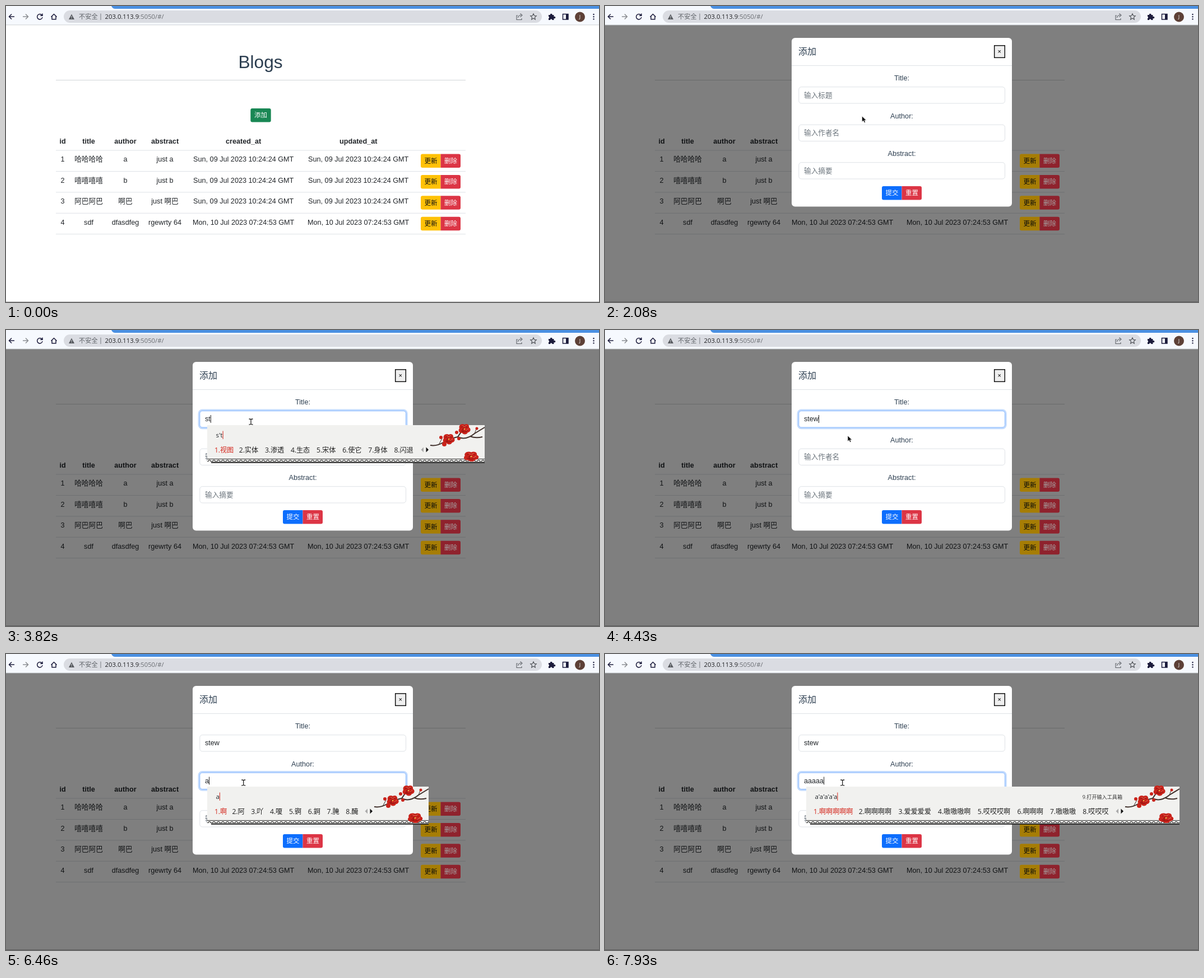
Write an HTML page that moves like this. It is 1058 px wide and 529 px high and loops after 8 s.

```html
<!DOCTYPE html>
<html lang="zh-CN">
<head>
<meta charset="utf-8">
<style>
html, body { margin: 0; width: 100%; height: 100%; overflow: hidden; background: #fff; }
svg { display: block; width: 100vw; height: 100vh; }
text { font-family: "Liberation Sans", "Noto Sans CJK SC", "Noto Sans CJK", sans-serif; font-size: 12.65px; fill: #212529; white-space: pre; }
.ui text { font-family: "Open Sans", "Noto Sans CJK SC", "Noto Sans CJK", sans-serif; }
.line { fill: none; stroke: #1c1c3c; stroke-width: 1.5; }
</style>
</head>
<body>
<svg id="stage" viewBox="0 0 1058 529" preserveAspectRatio="none">
  <defs>
    <pattern id="key" width="8" height="6" patternUnits="userSpaceOnUse" x="359" y="60">
      <path d="M0 .5H8M0 4.5H2.5V2.5H5.5V4.5H8" fill="none" stroke="#333"/>
    </pattern>
    <g id="bloom">
      <path d="M0-8C5-11 9-7 8-3C13 0 10 6 6 6C4 11-3 10-4 7C-10 8-12 2-9-1C-11-7-5-11 0-8Z" fill="#c9231b"/>
      <path d="M-6-3Q0-8 5-3M-6 3Q0 8 6 2M0-2Q-5 0-2 4" fill="none" stroke="#8d120f" stroke-width="1.2"/>
      <path d="M-4-6Q0-3 4-6M3 3Q6 1 7-1" fill="none" stroke="#ee6a55"/>
      <circle r="1.3" fill="#e9b24c"/>
    </g>
  </defs>
  <g id="page"></g>
  <rect id="shade" y="34" width="1058" height="495" opacity=".5"/>
  <g id="rowButtons"></g>
  <g id="modal"></g>
  <g class="ui" id="chrome">
    <rect width="1058" height="34" fill="#f6f9fe"/>
    <path d="M188 0H1058V5H195Q190 5 188 0Z" fill="#4a90e2"/>
    <path d="M0 33.8H1058" stroke="#cfd2d6"/>
    <rect x="103" y="8" width="853" height="22" rx="11" fill="#dadce2"/>
    <path class="line" d="M15 19H6M10 14.5L5.5 19L10 23.5"/>
    <path class="line" d="M30 19H39M35 14.5L39.5 19L35 23.5" style="stroke:#8a8d92"/>
    <path class="line" d="M64.2 16.5A4.7 4.7 0 1 0 65 20M65 13.5V17.2H61.3"/>
    <path class="line" d="M80.5 19.5L85.5 14.5L90.5 19.5M82 18.5V23.8H89V18.5"/>
    <path d="M117 14.5L122 24H112Z" fill="#55585d"/>
    <path d="M117 17.8V20.6M117 21.6V22.8" stroke="#dadce2" stroke-width="1.1"/>
    <path d="M169 13.5V25" stroke="#777a80"/>
    <path class="line" d="M913 17H911V24.5H920V22M913.5 21Q914 16.5 919 16.3M917.5 13.5L921 16.5L917.5 19.5" style="stroke:#5f6368;stroke-width:1.1"/>
    <path class="line" d="M941 13.8L942.6 17.3L946.3 17.7L943.5 20.2L944.3 24L941 22L937.700 24L938.500 20.200L935.700 17.700L939.400 17.300Z" style="stroke:#4a4d52;stroke-width:1.1"/>
    <path d="M968 16H971A1.8 1.8 0 1 1 974.500 16H977.500V19A1.800 1.800 0 1 1 977.500 22V25H974.500A1.700 1.700 0 0 0 971 25H968V22A1.700 1.700 0 0 0 968 18.800Z" fill="#1c1c3c"/>
    <rect class="line" x="993.500" y="14.500" width="9.500" height="9.500"/>
    <rect x="999" y="14" width="4" height="10" fill="#1c1c3c"/>
    <circle cx="1024" cy="19.500" r="9" fill="#5d4037"/>
    <path d="M1048.500 15v.01M1048.500 19.200v.01M1048.500 23.400v.01" stroke="#1c1c3c" stroke-width="2.400" stroke-linecap="round"/>
  </g>
  <g class="ui" id="panel">
    <rect id="sheet" x="359" width="395" height="60" fill="#f1f1ef"/>
    <rect id="trim" x="359" y="60" width="395" height="6" fill="#f1f1ef"/>
    <rect id="trimKey" x="359" y="60" width="395" height="6" fill="url(#key)"/>
    <rect id="trimBar" x="366" y="65.800" width="390" height="2" fill="#222"/>
    <g id="words"></g>
    <path id="redCaret" d="M0 10.500V25" stroke="#d4281e"/>
    <g id="arrows">
      <path d="M5 39.500V48.500L.5 44Z" fill="#aaa"/>
      <path d="M9.500 39.500V48.500L14 44Z" fill="#111"/>
    </g>
    <g id="flowers">
      <path d="M-97 36Q-86 38-74 31T-48 21Q-34 28-18 15L0 4M-48 21Q-42 13-38 5M-26 20Q-16 24-4 21" fill="none" stroke="#40302b" stroke-width="2"/>
      <path d="M-82 35L-76 24M-18 15L-15 7" stroke="#40302b"/>
      <use href="#bloom" x="-64" y="25"/>
      <use href="#bloom" x="-36" y="7"/>
      <use href="#bloom" transform="translate(-24 56) scale(1.25 .95)"/>
      <g fill="#c9231b"><circle cx="-78" cy="22" r="3"/><circle cx="-72" cy="34" r="4"/><circle cx="-50" cy="13" r="3"/><circle cx="-46" cy="24" r="3"/><circle cx="-14" cy="6" r="2.500"/></g>
    </g>
  </g>
  <path id="arrow" d="M0 0V10L2.500 7.800L4.200 11.500L6 10.700L4.400 7.200H7.600Z" fill="#111" stroke="#fff" stroke-width=".5"/>
  <path id="beam" d="M-3.500-5Q-.5-5 0-4Q.5-5 3.500-5M-3.500 5Q-.5 5 0 4Q.5 5 3.500 5M0-4V4" fill="none" stroke="#222" stroke-width="1.300"/>
</svg>
<script>
const LOOP = 8000, STEP = 70;
const $ = id => document.getElementById(id);

function add(parent, tag, attrs, text) {
  const el = document.createElementNS("http://www.w3.org/2000/svg", tag);
  for (const k in attrs) el.setAttribute(k, attrs[k]);
  if (text) el.textContent = text;
  return parent.appendChild(el);
}
const label = (parent, text, x, y, style = "", anchor = "start") =>
  add(parent, "text", { x, y, style, "text-anchor": anchor }, text);
const mid = (parent, text, x, y, style) => label(parent, text, x, y, style, "middle");
const show = (el, on) => { el.style.display = on ? "" : "none"; };
const set = (el, attrs) => { for (const k in attrs) el.setAttribute(k, attrs[k]); };

// A pair of joined buttons, 35.5 wide each
function pair(parent, x, y, items) {
  items.forEach(([text, fill, ink], i) => {
    const l = x + i * 35.5, r = l + 35.5;
    const d = i ? `M${l} ${y}H${r - 3}q3 0 3 3v18.500q0 3-3 3H${l}Z`
                : `M${r} ${y}H${l + 3}q-3 0-3 3v18.500q0 3 3 3H${r}Z`;
    add(parent, "path", { d, fill });
    mid(parent, text, l + 17.9, y + 16.2, `font-size:11.5px;fill:${ink}`);
  });
}

// Page
const page = $("page");
const rule = (y, color) => add(page, "path", { d: `M89 ${y}H820`, stroke: color });
add(page, "rect", { y: 34, width: 1058, height: 495, fill: "#fff" });
add(page, "path", { d: "M0 528.500H1058", stroke: "#bbb" });
mid(page, "Blogs", 454, 111, "font-size:31.6px;fill:#2c3e50");
rule(132.5, "#d2d5d8");
const addButton = add(page, "rect", { x: 436.3, y: 183, width: 36.4, height: 24.5, rx: 3 });
mid(page, "添加", 454.5, 199.2, "font-size:11.5px;fill:#fff");

const columns = [101, 147.5, 213, 283.5, 423.7, 628.7];
const early = "Sun, 09 Jul 2023 10:24:24 GMT", late = "Mon, 10 Jul 2023 07:24:53 GMT";
const rows = [
  ["1", "哈哈哈哈", "a", "just a", early, early],
  ["2", "嘻嘻嘻嘻", "b", "just b", early, early],
  ["3", "阿巴阿巴", "啊巴", "just 啊巴", early, early],
  ["4", "sdf", "dfasdfeg", "rgewrty 64", late, late]
];
["id", "title", "author", "abstract", "created_at", "updated_at"]
  .forEach((h, i) => mid(page, h, columns[i], 246, "font-weight:bold"));
rule(258, "#dee2e6");
rows.forEach((row, r) => {
  const y = r * 37.4;
  row.forEach((text, i) => mid(page, text, columns[i], 278.4 + y));
  rule(295.5 + y, "#dee2e6");
  pair($("rowButtons"), 740, 264.5 + y, [["更新", "#ffc107", "#111"], ["删除", "#dc3545", "#fff"]]);
});

// Dialog
const modal = $("modal");
add(modal, "rect", { x: 333, y: 57, width: 393, height: 301.5, rx: 6, fill: "#fff" });
add(modal, "path", { d: "M333 106.500H726", stroke: "#dee2e6" });
label(modal, "添加", 345, 87, "font-size:16px;fill:#2c3e50");
add(modal, "rect", { x: 694.7, y: 70.7, width: 18.6, height: 21.6, fill: "#efefef", stroke: "#111", "stroke-width": 1.5 });
mid(modal, "×", 703.8, 85.3, "font-size:11px;fill:#000");
const fields = [["Title:", "输入标题"], ["Author:", "输入作者名"], ["Abstract:", "输入摘要"]].map(([name, hint], i) => {
  const y = 144.7 + i * 67.5;
  mid(modal, name, 529.5, y - 11.7, "fill:#2c3e50");
  const box = { x: 345.8, y, width: 367.7, height: 29.3, rx: 4.5 };
  const ring = add(modal, "rect", { ...box, fill: "none", stroke: "#c2dbfe", "stroke-width": 6.4 });
  const frame = add(modal, "rect", { ...box, fill: "#fff" });
  return {
    y, ring, frame,
    hint: label(modal, hint, 355, y + 19.2, "fill:#6c757d"),
    text: label(modal, "", 355, y + 18.7),
    caret: add(modal, "path", { stroke: "#222" })
  };
});
pair(modal, 494, 322, [["提交", "#0d6efd", "#fff"], ["重置", "#dc3545", "#fff"]]);

// Browser bar texts
const bar = $("chrome");
label(bar, "不安全", 130, 23, "font-size:11.2px;fill:#5f6368");
const url = label(bar, "203.0.113.9", 176.5, 23, "font-size:11.3px;fill:#202124");
add(url, "tspan", { fill: "#6a6d72" }, ":5050/#/");
mid(bar, "J", 1024, 22.8, "font-size:9px;fill:#fff");

// Typing: time, field, value, candidates, right edge of the panel
const typing = [
  [3300, 0, ""],
  [3630, 0, "s", "是 说 上 时 使 谁 事 声", 754],
  [3820, 0, "st", "视图 实体 渗透 生态 宋体 使它 身体 闪退", 854],
  [3950, 0, "ste", "上天鹅 身体 实体 生态 视图 水田 食堂 渗透", 868],
  [4090, 0, "stew", "上天额外 身体额外 视图二维 实体 生态 渗透", 893],
  [4260, 0, "stew"],
  [5650, 1, ""],
  [6460, 1, "a", "啊 阿 吖 嗄 锕 錒 腌 醃", 754],
  [6590, 1, "aa", "啊啊 嗷嗷 爱爱 哎哎 啊啊啊 阿啊 哎啊 爱啊", 864],
  [6790, 1, "aaa", "啊啊啊 啊啊啊啊 爱爱爱爱 嗷嗷嗷啊 哎哎哎啊 嗷嗷嗷 爱爱爱 哎哎哎", 995, "9.打开工具箱"],
  [7330, 1, "aaaa", "啊啊啊啊 啊啊啊啊啊 爱爱爱爱 嗷嗷嗷啊 哎哎哎啊 啊啊啊 嗷嗷嗷 哎哎哎", 1025],
  [7530, 1, "aaaaa", "啊啊啊啊啊 啊啊啊啊 爱爱爱爱 嗷嗷嗷啊 哎哎哎啊 啊啊啊 嗷嗷嗷 哎哎哎", 1025, "9.打开输入工具箱"]
];

// Pointer moves: start, end, from, to
const moves = [
  [780, 1550, 1026, 520, 462, 200],
  [1620, 2020, 462, 200, 458.5, 197],
  [2740, 3160, 458.5, 197, 437, 164],
  [4290, 4430, 437, 164, 433, 189],
  [4500, 5110, 433, 189, 428, 245],
  [5310, 5580, 428, 245, 423.7, 230]
];

function pointer(t) {
  let move = null;
  for (const m of moves) if (t >= m[0]) move = m;
  if (!move) return null;
  const [t0, t1, x0, y0, x1, y1] = move;
  const p = Math.min(1, (Math.floor((t - t0) / STEP) + 1) / (Math.round((t1 - t0) / STEP) + 1));
  const e = p * p * (3 - 2 * p);
  return [x0 + (x1 - x0) * e, y0 + (y1 - y0) * e];
}

function drawPanel([, field, value, list, right, tip], withTip) {
  show($("panel"), !!list);
  if (!list) return;
  const words = $("words");
  words.replaceChildren();
  set($("panel"), { transform: `translate(0 ${170 + field * 67})` });
  ["sheet", "trim", "trimKey"].forEach(id => set($(id), { width: right - 359 }));
  set($("trimBar"), { width: right - 366 });
  set($("flowers"), { transform: `translate(${right} 0)` });
  set($("arrows"), { transform: `translate(${right - 114} 0)` });
  const spell = label(words, [...value].join("'"), 374.5, 22, "font-size:11.5px");
  set($("redCaret"), { transform: `translate(${375 + spell.getComputedTextLength()} 0)` });
  let x = 372;
  list.split(" ").forEach((word, i) => {
    label(words, `${i + 1}.${word}`, x, 48.6, `font-size:12.2px;letter-spacing:-.1px;fill:${i ? "#222" : "#d4281e"}`);
    x += 21.5 + 12.3 * word.length - (i ? 0 : 2.3);
  });
  if (withTip) label(words, tip, right - 102, 21.5, "font-size:9.1px;fill:#333", "end");
}

let shown = "";
function draw(t) {
  const open = t >= 2080;
  const at = pointer(t);
  const inside = (x, y, w, h) => !!at && at[0] > x && at[0] < x + w && at[1] > y && at[1] < y + h;

  show($("shade"), open);
  show(modal, open);
  $("rowButtons").style.filter = open ? "brightness(.65)" : "none";
  set(addButton, { fill: !open && inside(436, 183, 37, 25) ? "#146c43" : "#198754" });

  const past = typing.filter(s => t >= s[0]);
  const state = past[past.length - 1];
  const values = ["", "", ""];
  past.forEach(s => { values[s[1]] = s[2]; });
  fields.forEach((f, i) => {
    const on = !!state && state[1] === i;
    f.text.textContent = values[i];
    show(f.hint, !values[i]);
    show(f.ring, on);
    set(f.ring, { opacity: on ? Math.min(1, (t - typing[i ? 6 : 0][0] + 70) / 140) : 0 });
    set(f.frame, { stroke: on ? "#86b7fe" : "#dee2e6" });
    const start = on && state[0] === 5650 ? 5690 : on ? state[0] : 0;
    show(f.caret, on && (t < start || (t - start) % 1000 < 500));
    if (on && open) {
      const x = 355.5 + (values[i] ? f.text.getComputedTextLength() : 0);
      set(f.caret, { d: `M${x} ${f.y + 7.3}v14` });
    }
  });

  const withTip = !!state && !!state[5] && t >= state[0] + 400;
  const key = past.length + (withTip ? "+" : "");
  if (key !== shown) {
    shown = key;
    drawPanel(state || [], withTip);
  }

  const typable = open && fields.some(f => inside(345, f.y, 369, 29.3));
  show($("arrow"), at && !typable);
  show($("beam"), at && typable);
  if (at) set($(typable ? "beam" : "arrow"), { transform: `translate(${at})` });
}

function tick() {
  draw(performance.now() % LOOP);
  requestAnimationFrame(tick);
}
tick();
</script>
</body>
</html>
```
